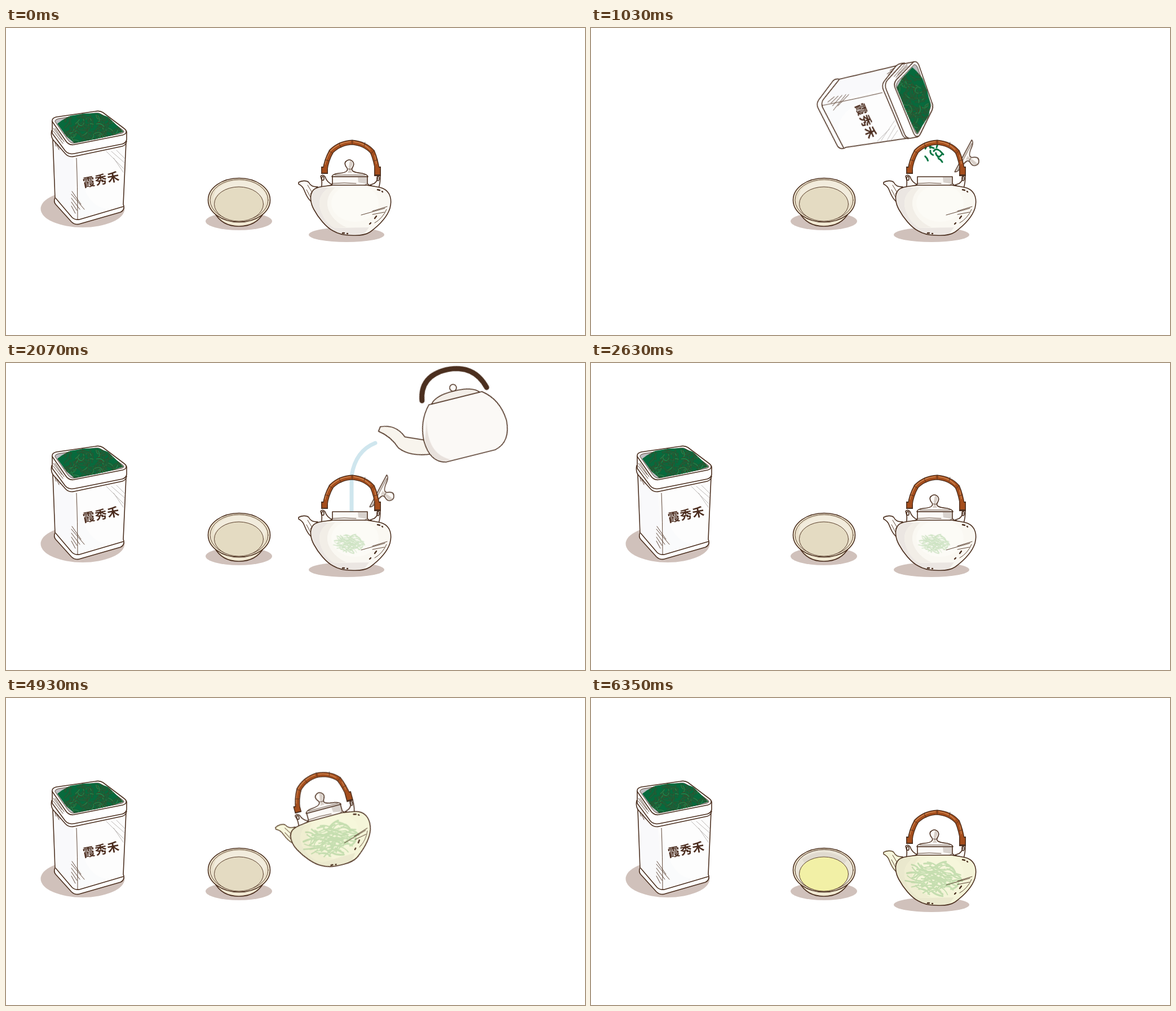
Write an HTML page that moves like this. It is 1027x545 px and loops after 6980 ms.

```html
<!DOCTYPE html>
<html lang="zh">
<head>
<meta charset="utf-8">
<title>Brewing tea</title>
<style>
html, body { margin: 0; width: 100%; height: 100%; overflow: hidden; background: #fff; }
svg { display: block; width: 100%; height: 100%; }
.ink { stroke: #4b2f1f; stroke-width: 1.6; stroke-linecap: round; stroke-linejoin: round; }
.line { fill: none; }
.thin { stroke-width: .9; }
.shadow { fill: #d0c1bb; }
.label { font: 700 21px "Noto Sans CJK TC", "Noto Sans CJK SC", "Noto Sans CJK", sans-serif; letter-spacing: 1px; fill: #4b2c1e; }

.tin, .tin-shadow, .lid, .fall, .pile, .threads, .tint, .kettle, .water, .stand, .lift, .stream, .fill {
  animation: 6980ms step-end infinite;
}
.tin { animation-name: tin; transform-origin: 81px 165px; }
.tin-shadow { animation-name: tin-shadow; }
.lid { animation-name: lid; transform-origin: 610px 262px; }
.fall { animation-name: fall; }
.pile { animation-name: pile; }
.threads { animation-name: threads; transform-origin: 609px 321px; }
.tint { animation-name: tint; }
.kettle { animation-name: kettle; transform-origin: 790px 90px; }
.water { animation-name: water; }
.stand { animation-name: stand; }
.lift { animation-name: lift; transform-origin: 610px 290px; }
.stream { animation-name: stream; }
.fill { animation-name: fill; }

@keyframes tin {
  0%, 20.48%, 100% { transform: none; }
  10.6% { transform: translate(492px, -106px) rotate(76deg); }
  11.45% { transform: translate(492px, -106px) rotate(78deg); }
  12.46% { transform: translate(492px, -106px) rotate(80deg); }
  12.89% { transform: translate(492px, -109px) rotate(82deg); }
  14.32% { transform: translate(492px, -106px) rotate(79deg); }
  15.32% { transform: translate(492px, -109px) rotate(82deg); }
  16.61% { transform: translate(492px, -106px) rotate(80deg); }
}
@keyframes tin-shadow { 0%, 20.48%, 100% { opacity: 1; } 10.6% { opacity: 0; } }
@keyframes lid {
  0%, 37.67%, 100% { transform: none; }
  5.3% { transform: translate(52px, -34px) rotate(118deg); }
}
@keyframes fall {
  0%, 16.61%, 100% { opacity: 0; transform: none; }
  12.89% { opacity: 1; transform: none; }
  14.32% { opacity: 1; transform: translateY(35px); }
  15.32% { opacity: 1; transform: translateY(70px); }
}
@keyframes pile { 0%, 29.65%, 100% { opacity: 0; } 16.61% { opacity: 1; } 24.35% { opacity: .75; } }
@keyframes threads {
  0%, 100% { opacity: 0; transform: scale(.55); }
  29.65% { opacity: .9; transform: scale(.55); }
  42.4% { opacity: 1; transform: scale(.78); }
  52% { opacity: 1; transform: none; }
}
@keyframes tint { 0%, 100% { opacity: 0; } 39.11% { opacity: 1; } }
@keyframes kettle {
  0%, 36.24%, 100% { opacity: 0; transform: none; }
  21.91% { opacity: 1; transform: none; }
  24.35% { opacity: 1; transform: rotate(-14deg); }
  35.38% { opacity: 1; transform: none; }
}
@keyframes water { 0%, 35.38%, 100% { opacity: 0; } 24.35% { opacity: 1; } }
@keyframes stand {
  0%, 90.97%, 100% { opacity: 1; }
  70.62% { opacity: 0; }
  85.81% { opacity: 0; animation-timing-function: linear; }
}
@keyframes lift {
  0%, 100% { opacity: 0; transform: none; }
  70.62% { opacity: 1; transform: translate(-40px, -68px) rotate(-15deg); }
  81.08% { opacity: 1; transform: translate(-107px, -128px) rotate(-35deg); }
  85.81% { opacity: 1; transform: translate(-107px, -128px) rotate(-35deg); animation-timing-function: linear; }
  90.97% { opacity: 0; transform: translate(-107px, -128px) rotate(-35deg); }
}
@keyframes stream {
  0%, 90.97%, 100% { opacity: 0; }
  81.08% { opacity: 1; }
  85.81% { opacity: 1; animation-timing-function: linear; }
}
@keyframes fill {
  0% { opacity: 0; }
  85.81% { opacity: 0; animation-timing-function: linear; }
  90.97%, 100% { opacity: 1; }
}
</style>
</head>
<body>
<svg viewBox="0 0 1027 545">
  <defs>
    <clipPath id="opening"><path d="M91 170 L99 164 114 156 138 152 163 151 181 158 201 177 208 184 190 190 160 197 121 204 107 192Z"/></clipPath>
    <path id="body-shape" d="M580 279 C566 281 550 281 544 289 C538 297 540 311 546 322 C554 337 568 354 580 360 C590 366 600 368 612 368 C626 369 637 368 646 362 C662 350 676 336 681 320 C685 305 682 291 669 285 C660 281 648 281 641 279Z"/>
    <path id="spout-shape" d="M519 274 C524 271 533 270 537 274 C540 280 544 282 553 282 L541 294 V308 C534 302 531 293 529 288 C527 282 523 279 519 277Z"/>
    <path id="cane" d="M566 252 Q568 235 577 219 Q592 204 614 203 Q637 205 650 220 Q656 234 659 254"/>
    <clipPath id="body-clip"><use href="#body-shape"/></clipPath>

    <g id="lid" class="ink">
      <path fill="#fdfbf8" d="M578 264 Q579 259 590 258 Q603 257 605 253 Q607 250 603 246 Q599 239 604 236 Q609 232 614 236 Q619 240 615 247 Q612 251 615 254 Q620 257 632 258 Q641 260 642 264Z"/>
      <path fill="#d8cfc8" stroke="none" d="M610 235 Q618 238 613 246 Q610 252 614 257 L606 257 Q609 251 608 246Z"/>
      <path class="line thin" d="M583 261 H637 M607 250 Q611 252 614 250"/>
    </g>

    <g id="pot" class="ink">
      <path fill="#fdfbf8" d="M558 263 Q562 259 566 264 Q569 274 579 278 L559 284 Q562 274 558 263Z M653 276 Q660 271 659 264 Q661 259 664 262 Q664 275 661 284 L645 279Z"/>
      <ellipse class="line" cx="562" cy="267" rx="2" ry="3.5"/>
      <ellipse class="line" cx="660" cy="267" rx="2" ry="4"/>
      <g class="line">
        <use href="#cane" stroke-width="9"/>
        <path stroke-width="12" stroke-linecap="butt" d="M565 246 V259 M659 246 V263"/>
        <use href="#cane" stroke="#a44d1c" stroke-width="6.4"/>
        <path stroke="#a44d1c" stroke-width="9" stroke-linecap="butt" d="M565 248 V257 M659 248 V260"/>
        <path stroke="#d18a55" stroke-width="1.3" d="M566 242 Q568 231 576 218 Q591 203 611 202 M617 202 Q634 204 646 216 M654 226 L657 241"/>
        <path class="thin" d="M567 234 L573 236 M573 218 L580 223 M591 205 L594 212 M614 199 V207 M637 203 L635 210 M653 218 L647 223 M659 234 L653 236"/>
      </g>
      <use href="#spout-shape" fill="#fdfbf8"/>
      <path fill="#fbf9f6" d="M579 264 H641 V276 Q645 281 650 282 H569 Q579 280 579 276Z"/>
      <path fill="#d8d2cd" stroke="none" d="M624 265 H640 V277 L625 274Z"/>
      <path class="line thin" d="M579 276 Q600 274 621 276 M607 282 Q635 282 640 277"/>
      <g clip-path="url(#body-clip)" stroke="none">
        <use href="#body-shape" fill="#faf8f2"/>
        <path fill="#ebe6e2" d="M540 283 L573 283 Q550 299 558 323 Q565 345 583 355 L644 354 632 370 600 370 570 355 540 315Z"/>
        <path fill="#f2eee7" d="M573 283 Q550 299 558 323 Q565 345 583 355 L604 354 Q579 343 571 320 Q566 299 584 283Z"/>
        <ellipse cx="619" cy="311" rx="42" ry="33" fill="#fcfbf6"/>
      </g>
    </g>

    <g id="tea-tint" fill="#e9eca4" fill-opacity=".33">
      <use href="#body-shape"/><use href="#spout-shape"/>
    </g>

    <g id="leaves" fill="none" stroke="#93c583" stroke-linecap="round" opacity=".48"></g>

    <g id="pot-lines" class="ink line">
      <use href="#body-shape"/>
      <path class="thin" d="M650 331 L671 327 M630 332 L672 320 M650 325 L676 317 M654 346 Q668 338 675 322 M535 279 L543 292 M533 287 L540 300"/>
      <path stroke-width="2.4" d="M659 287 L663 288 M667 290 L668 291 M597 364 L600 364 M605 365 L606 365 M645 348 L647 346 M654 338 L657 334"/>
    </g>
  </defs>

  <ellipse class="shadow tin-shadow" cx="136" cy="321" rx="74.5" ry="33"/>
  <ellipse class="shadow" cx="413" cy="343" rx="59" ry="16"/>

  <g class="ink">
    <path fill="#f0e8d2" d="M370 328 C380 346 396 352 413 352 C430 352 447 346 457 328Z"/>
    <ellipse cx="413.5" cy="305.5" rx="55" ry="39" fill="#f3ead3"/>
    <ellipse class="thin" cx="413.5" cy="305.5" rx="51.5" ry="36.5" fill="#e9e0ca"/>
    <path fill="#f2ecdd" stroke="none" d="M372 287 Q392 270 416 271 Q450 272 462 298 L458 314 Q452 284 414 281 Q382 281 366 307Z"/>
    <ellipse class="thin" cx="413" cy="312.5" rx="43.5" ry="30.5" fill="#e4dbc2"/>
    <g class="fill">
      <ellipse cx="413.5" cy="305.5" rx="51.5" ry="36.5" class="thin" fill="#ebe6d9"/>
      <path fill="#e0dacf" stroke="none" d="M374 286 Q413 260 454 288 L449 294 Q413 268 379 293Z"/>
      <ellipse cx="413" cy="312.5" rx="43.5" ry="30.5" class="thin" fill="#f2f0a6"/>
    </g>
  </g>

  <g class="stream">
    <ellipse cx="415" cy="323" rx="20" ry="11" fill="#f2f0a6"/>
    <path fill="none" stroke="#eef0a8" stroke-width="5" stroke-linecap="round" d="M421 201 Q414 214 414 240 V322"/>
  </g>

  <g class="fall"><g id="flakes" fill="none" stroke="#0b7745" stroke-width="3" stroke-linecap="round"></g></g>

  <path class="water" fill="none" stroke="#cfe6ee" stroke-width="7" stroke-linecap="round" d="M655 142 Q620 156 613 200 V275"/>

  <g class="stand">
    <ellipse class="shadow" cx="604" cy="367" rx="67" ry="13"/>
    <g class="lid"><use href="#lid"/></g>
    <use href="#pot"/>
    <g class="tint"><use href="#tea-tint"/></g>
    <g class="pile" id="pile"></g>
    <g class="threads"><use href="#leaves"/></g>
    <use href="#pot-lines"/>
  </g>

  <g class="lift">
    <use href="#lid"/><use href="#pot"/><use href="#tea-tint"/><use href="#leaves"/><use href="#pot-lines"/>
  </g>

  <g class="kettle ink">
    <path class="line" stroke-width="9" d="M745 55 Q752 12 800 12 Q850 14 862 60"/>
    <path fill="#f8f4ed" d="M735 125 L700 110 Q690 84 662 82 L657 89 Q676 103 684 126 Q700 147 739 151Z"/>
    <path fill="#fbf9f6" d="M755 65 Q732 90 731 125 Q732 165 760 171 H850 Q880 164 882 125 Q880 86 852 65Z"/>
    <path fill="#e8e1dc" stroke="none" d="M745 90 Q730 150 770 169 H760 Q733 164 733 125Z"/>
    <path fill="#f3eee8" d="M760 65 Q770 52 803 52 Q838 52 848 65Z"/>
    <circle cx="804" cy="46" r="6" fill="#fdfbf8"/>
  </g>

  <g class="tin ink">
    <path fill="#fdfdfd" d="M83 198 L87 301 Q84 308 88 313 L116 344 Q122 350 130 348 L203 327 Q210 324 209 316 L208 313 213 202 120 223Z"/>
    <path fill="#f9f9fb" stroke="none" d="M85 204 L119 229 126 339 88 302Z"/>
    <path fill="#fafbfc" stroke="none" d="M127 240 Q138 318 180 321 L128 338Z"/>
    <path class="line" d="M88 302 L117 336 Q122 341 130 340 L208 317"/>
    <path class="line thin" d="M125 231 Q127 280 127 340"/>
    <path fill="#fdfdfd" d="M81 182 Q79 193 84 199 L106 224 Q112 230 121 228 L206 210 Q213 208 214 201Z"/>
    <path fill="#fefefe" d="M82 166 Q81 160 89 158 L158 148 Q166 146 172 150 L209 178 Q215 182 214 188 V198 Q213 204 206 206 L121 223 Q111 225 105 218 L82 187Z"/>
    <path class="line" d="M82 166 L105 199 Q111 209 121 207 L207 190 Q214 188 213 183"/>
    <path class="thin" fill="#bdbdc0" d="M87 166 Q86 163 93 161 L158 151 Q165 150 169 153 L207 181 Q212 185 205 187 L123 204 Q115 206 110 199Z"/>
    <g clip-path="url(#opening)">
      <path fill="#076a3d" stroke="none" d="M85 145 H215 V210 H85Z"/>
      <g id="dry" fill="none"></g>
    </g>
    <path class="line thin" d="M84 178 L99 198 M84 183 L101 205 M87 178 L103 202 M86 201 L89 210 M89 204 L94 216 M92 207 L96 214 M117 290 L133 313 M116 295 L139 322 M116 302 L131 322 M116 309 L126 324 M116 316 L123 329"/>
    <path class="line" stroke="#aaa5a2" stroke-width=".8" d="M178 219 L209 250 M187 219 L210 239 M191 231 L208 256 M196 217 L211 232"/>
    <text class="label" stroke="none" transform="translate(138 283) rotate(-11)">霞秀禾</text>
  </g>
</svg>

<script>
const make = (parent, attrs) => {
  const path = document.createElementNS("http://www.w3.org/2000/svg", "path");
  for (const key in attrs) path.setAttribute(key, attrs[key]);
  document.getElementById(parent).append(path);
};

let seed = 7;
const random = () => (seed = seed * 16807 % 2147483647) / 2147483647;
const between = (a, b) => a + random() * (b - a);

const curl = (x, y, length, angle, bend) => {
  const dx = Math.cos(angle) * length / 2, dy = Math.sin(angle) * length / 2;
  return `M${x - dx} ${y - dy} Q${x - dy * bend} ${y + dx * bend} ${x + dx} ${y + dy}`;
};

// Dry tea in the tin: each curl has a brown edge
for (let i = 0; i < 130; i++) {
  const d = curl(between(88, 210), between(150, 206), between(9, 17), between(0, 6.3), between(-1.6, 1.6));
  make("dry", { d, stroke: "#4d3a20", "stroke-width": 2.8 });
  make("dry", { d, stroke: i % 3 ? "#077043" : "#0d8c50", "stroke-width": 1.7 });
}

for (let i = 0; i < 12; i++) {
  make("flakes", { d: curl(between(590, 622), between(170, 200), 9, between(0, 6.3), between(-1, 1)) });
}

// Broad leaves heaped in the pot, outer ring first
for (let i = 0; i < 24; i++) {
  const angle = i * 2.4, reach = i < 13 ? 13 : 5;
  const x = 608 + Math.cos(angle) * reach, y = 319 + Math.sin(angle) * reach * .85;
  make("pile", {
    d: "M-9 0 Q-3 -9 6 -6 L14 0 Q6 8 -2 6Z M-7 0 L12 0",
    transform: `translate(${x} ${y}) rotate(${angle * 57.3 + between(-25, 25)})`,
    fill: i % 3 ? "#669869" : "#568b5d", stroke: "#3f7750", "stroke-width": .7
  });
}

// Steeped strands, denser towards the middle
for (let i = 0; i < 90; i++) {
  const angle = i * 2.4, reach = Math.pow(i / 90, .6);
  make("leaves", {
    d: curl(609 + Math.cos(angle) * 44 * reach, 320 + Math.sin(angle) * 28 * reach,
      between(12, 22), between(-.7, .9), between(-.7, .7)),
    "stroke-width": between(1.6, 3.6)
  });
}
</script>
</body>
</html>
```
